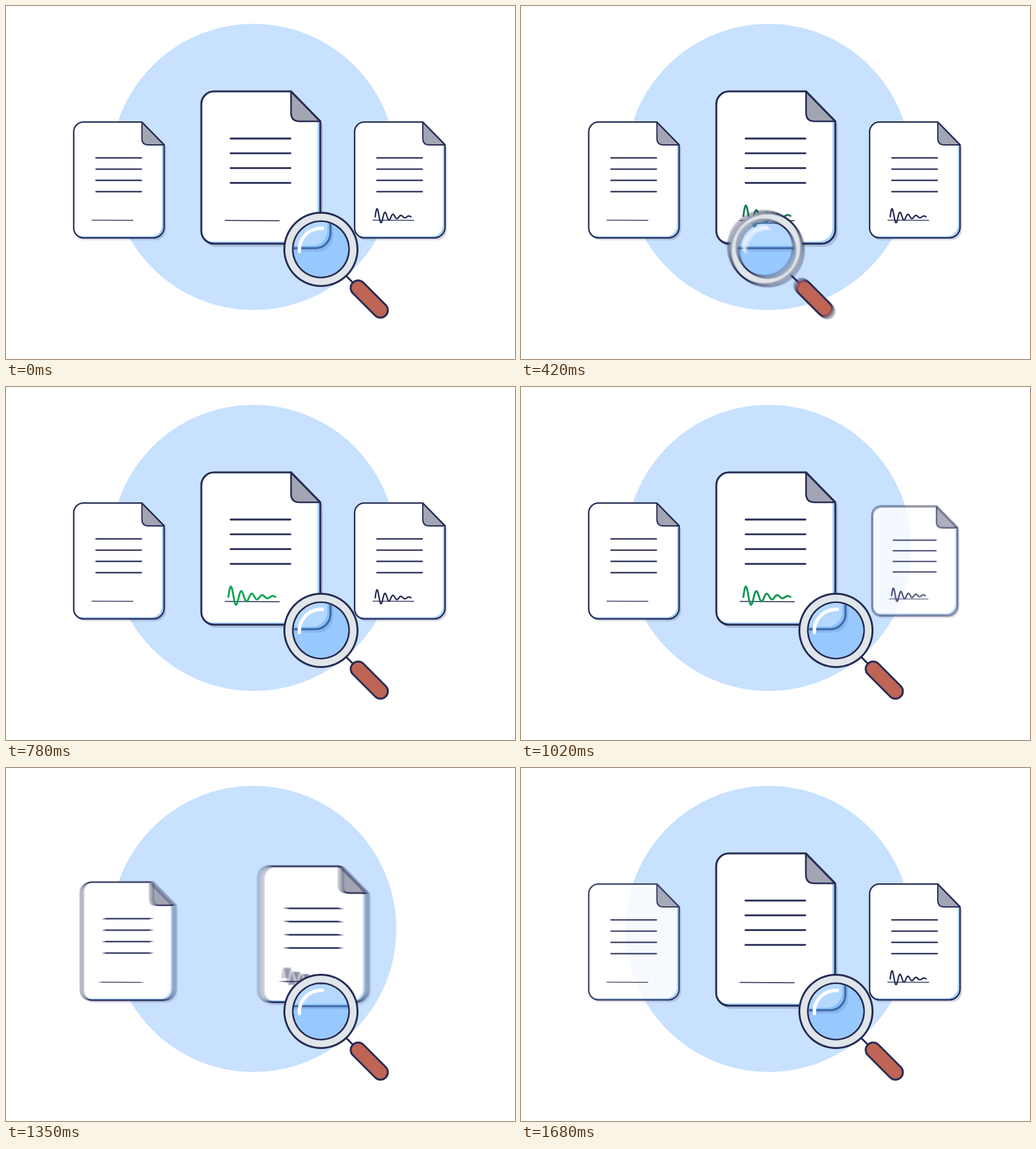
These frames come from a looping animation (800 px wide and 554 px high, 1710 ms). An HTML page with a canvas:

```html
<!DOCTYPE html>
<html lang="en">
<head>
<meta charset="utf-8">
<title>Document check</title>
<style>
  html, body { margin: 0; width: 100%; height: 100%; overflow: hidden; background: #fff; }
  canvas { display: block; width: 800px; height: 554px; }
</style>
</head>
<body>
<canvas id="stage" width="800" height="554"></canvas>
<script>
const W = 800, H = 554, LOOP = 1710, STEP = 30;
const SHUTTER = 16, SAMPLES = 7;
const NAVY = '#252b54', SKY = '#c8e1ff';
const SMALL = 0.76;
const LEFT = [177.5, 273], MID = [400.5, 253.5], RIGHT = [619, 273];

const newLayer = () => {
  const c = document.createElement('canvas');
  c.width = W;
  c.height = H;
  return c.getContext('2d');
};
const screen = document.getElementById('stage').getContext('2d');
const scene = newLayer();
const fadeLayer = newLayer();

const clamp = v => Math.max(0, Math.min(1, v));
const ramp = (t, start, end) => clamp((t - start) / (end - start));
const lerp = (a, b, p) => a + (b - a) * p;
const sineEase = u => (1 - Math.cos(Math.PI * u)) / 2;

// Page shapes, centred on the origin
const page = new Path2D(
  'M-73.5-119.5H47.5L93.5-72.5V97.5A22 22 0 0 1 71.5 119.5H-73.5' +
  'A20 20 0 0 1-93.5 99.5V-99.5A20 20 0 0 1-73.5-119.5Z');
const fold = new Path2D('M47.5-119.5V-86Q47.5-72.5 61-72.5H93.5Z');

const scribble = new Path2D();
for (let i = 0; i <= 80; i++) {
  const u = i / 80;
  scribble.lineTo(-51 + 74 * u, 76 - 19 * Math.exp(-2.6 * u) * Math.sin(u * Math.PI * 9));
}

function stroke(c, path, color, width) {
  c.strokeStyle = color;
  c.lineWidth = width;
  c.stroke(path);
}

function line(c, x1, y1, x2, y2, color, width) {
  c.beginPath();
  c.moveTo(x1, y1);
  c.lineTo(x2, y2);
  c.strokeStyle = color;
  c.lineWidth = width;
  c.stroke();
}

function disc(c, x, y, r, fill) {
  c.beginPath();
  c.arc(x, y, r, 0, Math.PI * 2);
  c.fillStyle = fill;
  c.fill();
}

function backdrop(c) {
  c.fillStyle = '#fff';
  c.fillRect(0, 0, W, H);
  disc(c, 389, 252.5, 224.5, SKY);
}

// ink: { color, width, alpha } of the pen line, or nothing
function drawPage(c, { x, y, scale }, ink, withText = true) {
  c.save();
  c.translate(x, y);
  c.scale(scale, scale);
  c.lineCap = c.lineJoin = 'round';

  c.save();
  c.translate(4, 5);
  c.fillStyle = 'rgba(45, 55, 100, .2)';
  c.fill(page);
  c.restore();

  c.save();
  c.clip(page);
  c.fillStyle = '#a6d2ff';
  c.fillRect(-100, -125, 200, 250);
  c.translate(-4.5, -3.5);
  c.fillStyle = '#fff';
  c.fill(page);
  c.fillRect(-100, -125, 150, 200);
  c.restore();

  c.fillStyle = '#a2a5b3';
  c.fill(fold);
  stroke(c, fold, NAVY, 2.6);
  stroke(c, page, NAVY, 3);

  if (withText) {
    for (let i = 0; i < 4; i++) {
      const ly = -45.5 + i * 23.2;
      line(c, -47.5, ly, 46.5, ly, NAVY, 2.8);
    }
  }
  line(c, -56, 83, 29, 83.5, NAVY, 1.6);
  if (ink && ink.alpha > 0) {
    c.globalAlpha = ink.alpha;
    stroke(c, scribble, ink.color, ink.width);
  }
  c.restore();
}

function drawFaded(c, alpha, draw) {
  if (alpha <= 0) return;
  if (alpha >= 1) return draw(c);
  fadeLayer.clearRect(0, 0, W, H);
  draw(fadeLayer);
  c.globalAlpha = alpha;
  c.drawImage(fadeLayer.canvas, 0, 0);
  c.globalAlpha = 1;
}

// Loop of the magnifier: time, x, y
const route = [
  [0, 495, 382], [120, 460, 343], [240, 395, 315], [330, 364, 342],
  [420, 385, 381], [510, 430, 401], [600, 477, 399], [720, 495, 382]
];

function lensAt(t) {
  const last = route.length - 1;
  if (t <= 0 || t >= route[last][0]) return [495, 382];
  const i = route.findIndex(k => k[0] > t) - 1;
  const a = route[i], b = route[i + 1], span = b[0] - a[0];
  const u = (t - a[0]) / span;
  const slope = (n, axis) => n <= 0 || n >= last ? 0 :
    (route[n + 1][axis] - route[n - 1][axis]) / (route[n + 1][0] - route[n - 1][0]);
  return [1, 2].map(axis =>
    lerp(a[axis], b[axis], u * u * (3 - 2 * u)) +
    span * u * (1 - u) * ((1 - u) * slope(i, axis) - u * slope(i + 1, axis)));
}

function travel(from, to, p, scale) {
  return { x: lerp(from[0], to[0], p), y: lerp(from[1], to[1], p), scale };
}

function magnified({ x, y, scale }) {
  return { x: x + 8.5 * scale, y: y - 2.5 * scale, scale: scale * 1.08 };
}

function drawLens(c, [x, y], contents) {
  c.save();
  c.lineCap = 'round';
  line(c, x + 40, y + 42, x + 52, y + 54, NAVY, 3);
  line(c, x + 58.5, y + 60.5, x + 93.5, y + 95.5, NAVY, 26.5);
  line(c, x + 58.5, y + 60.5, x + 93.5, y + 95.5, '#be6555', 20.5);

  disc(c, x, y, 59, NAVY);
  disc(c, x, y, 56, '#dfe5e9');
  disc(c, x, y, 45.5, NAVY);

  c.save();
  c.beginPath();
  c.arc(x, y, 42.7, 0, Math.PI * 2);
  c.clip();
  backdrop(c);
  contents(c);
  c.fillStyle = 'rgba(97, 172, 255, .47)';
  c.fillRect(x - 50, y - 50, 100, 100);
  c.restore();

  c.beginPath();
  c.arc(x, y + 1, 34, Math.PI * 0.98, Math.PI * 1.52);
  c.strokeStyle = '#fff';
  c.lineWidth = 5.5;
  c.stroke();
  c.restore();
}

function inkAt(t) {
  const green = ramp(t, 300, 480) - ramp(t, 1000, 1180);
  const mix = (a, b) => Math.round(lerp(a, b, green));
  return {
    color: `rgb(${mix(37, 18)}, ${mix(43, 166)}, ${mix(84, 84)})`,
    width: lerp(1.2, 3, ramp(t, 260, 420)),
    alpha: ramp(t, 100, 200)
  };
}

function drawScene(c, t) {
  const out = sineEase(ramp(t, 1108, 1679));
  const outScale = sineEase(ramp(t, 1083, 1654));
  const into = sineEase(ramp(t, 1285, 1687));
  const leaving = travel(MID, RIGHT, out, lerp(1, SMALL, outScale));
  const arriving = travel(LEFT, MID, into, lerp(SMALL, 1, into));
  const vanish = ramp(t, 965, 1195);
  const grow = 1 - (1 - ramp(t, 1460, 1680)) ** 4;
  const ink = inkAt(t);
  const dark = { color: NAVY, width: 3, alpha: 1 };

  backdrop(c);
  drawFaded(c, ramp(t, 1460, 1710), l =>
    drawPage(l, travel(LEFT, LEFT, 0, SMALL * grow)));
  drawFaded(c, 1 - ramp(t, 980, 1230), l =>
    drawPage(l, travel(RIGHT, RIGHT, 0, SMALL * (1 - vanish * vanish)), dark));
  drawPage(c, arriving);
  // The pen line stays on the paper once the glass has passed over it
  drawPage(c, leaving, t > 300 ? ink : null);

  drawLens(c, lensAt(t), l => {
    drawPage(l, magnified(arriving), null, false);
    drawFaded(l, 1 - ramp(t, 1380, 1500), f =>
      drawPage(f, magnified(leaving), t < 1100 ? ink : null, false));
  });
}

// Average several moments around t for motion blur
function render(t) {
  for (let k = 0; k < SAMPLES; k++) {
    drawScene(scene, t + (k / (SAMPLES - 1) - 0.5) * SHUTTER);
    screen.globalAlpha = 1 / (k + 1);
    screen.drawImage(scene.canvas, 0, 0);
  }
}

let shown = -1;
const begin = performance.now();
function tick() {
  const t = Math.floor(((performance.now() - begin) % LOOP) / STEP) * STEP;
  if (t !== shown) render(shown = t);
  requestAnimationFrame(tick);
}
tick();
</script>
</body>
</html>
```
